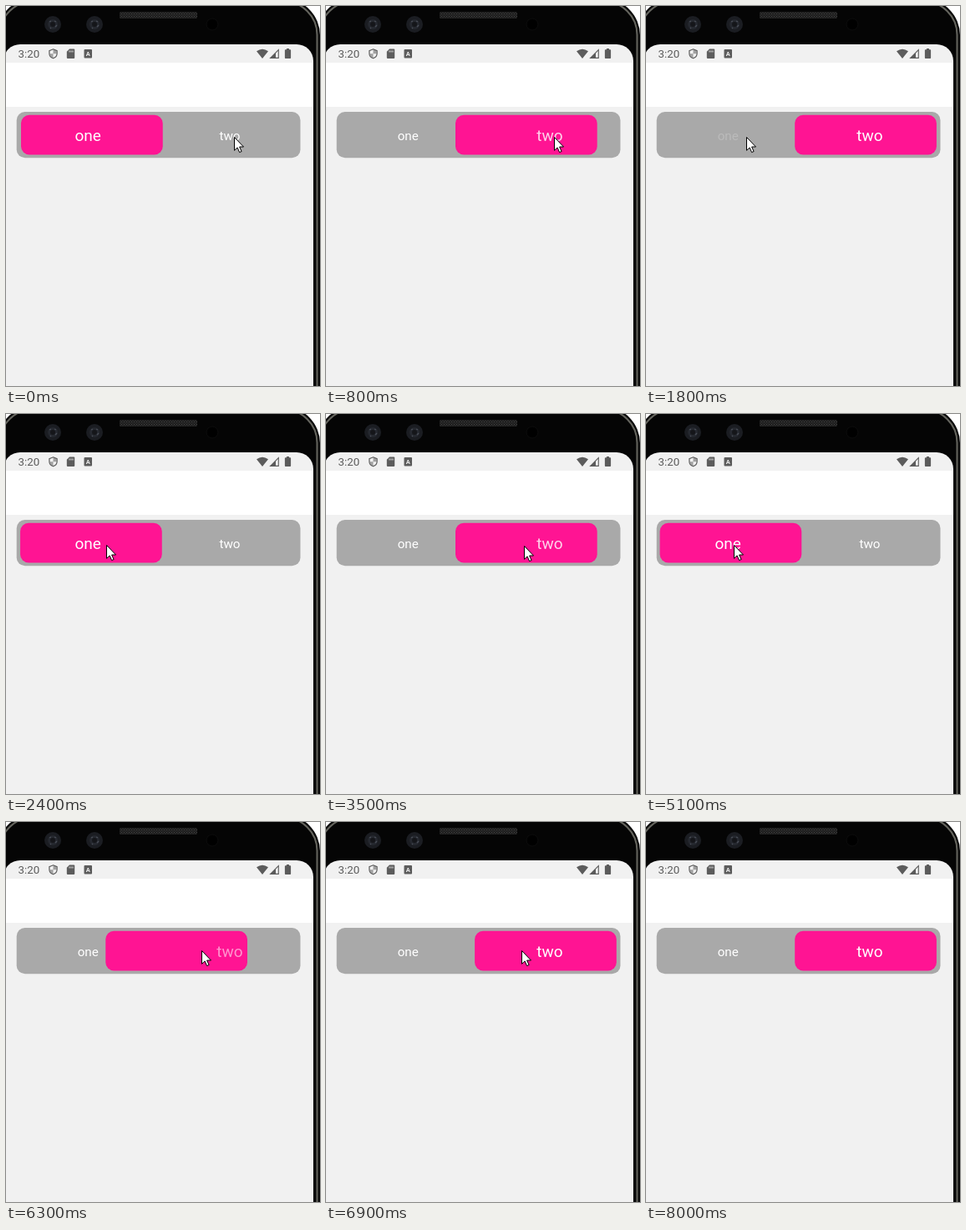
An HTML page for the animation above (9000 ms loop, 376x456 px).

```html
<!DOCTYPE html>
<html lang="en">
<head>
<meta charset="utf-8">
<title>Segmented switch</title>
<style>
  html, body { margin: 0; width: 100%; height: 100%; overflow: hidden; background: #fff; }
  svg { display: block; font-family: Roboto, sans-serif; }
</style>
</head>
<body>
<svg width="376" height="456" viewBox="0 0 376 456">
  <defs>
    <pattern id="mesh" width="3" height="3" patternUnits="userSpaceOnUse">
      <rect width="3" height="3" fill="#1c1c1c"/>
      <path d="M0 0h1v1H0zM1.5 1.5h1v1h-1z" fill="#444"/>
    </pattern>
    <g id="lens">
      <circle r="10" fill="#1b1d22"/>
      <circle r="6" fill="#25282f"/>
      <circle r="3" fill="#15161a"/>
      <path d="M-4-3l2-1M3 3l2-2M-3 4l1 1M2-4l2 1" stroke="#4a4e57" stroke-width="1.3"/>
    </g>
  </defs>

  <!-- phone body -->
  <rect x="-11" y="-9" width="387" height="600" rx="44" fill="#0a0a0a"/>
  <rect x="-7.5" y="-5.5" width="380" height="600" rx="40" fill="#050505" stroke="#66665f" stroke-width="2"/>
  <rect x="136" y="7" width="93" height="8" rx="1.5" fill="url(#mesh)"/>
  <use href="#lens" x="56" y="22"/>
  <use href="#lens" x="106" y="22"/>
  <circle cx="247" cy="22" r="7" fill="#000" stroke="#0d0d0d"/>

  <!-- screen -->
  <rect x="-3" y="46" width="371" height="500" rx="20" fill="#f1f1f1"/>
  <rect y="68" width="368" height="53" fill="#fff"/>

  <!-- status bar -->
  <g fill="#5c5c5c">
    <text x="14.5" y="62.3" font-size="13.3">3:20</text>
    <path d="M56.5 51.8l4.6 1.8v3.4c0 2.8-2 4.9-4.6 5.8-2.6-.9-4.6-3-4.6-5.8v-3.4z" fill="none" stroke="#5c5c5c" stroke-width="1.2"/>
    <path d="M56.5 52l4 1.6v3.6h-4zM52.5 57.2h4v5c-2.300-1-3.600-2.700-4-5z" opacity=".55"/>
    <path d="M76 51.500h5.200q1 0 1 1v9.500q0 1-1 1h-7.400q-1 0-1-1v-7.200z"/>
    <path d="M76 53.500v2M78 53.500v2M80 53.500v2" stroke="#f1f1f1" stroke-width=".9"/>
    <rect x="93.500" y="52" width="9.500" height="10.500" rx="1"/>
    <text x="98.250" y="60" font-size="7.500" font-weight="700" text-anchor="middle" style="fill:#f1f1f1">A</text>
    <path d="M300 54.300q7-5 14 0L307 63z"/>
    <path d="M326.300 52.700v9.700h-9.700z" fill="none" stroke="#5c5c5c" stroke-width="1.1"/>
    <path d="M316 63l7-7v7z"/>
    <path d="M336 51h3v1.200h1.300q.8 0 .8.800v9.200q0 .8-.8.800h-5.600q-.8 0-.8-.8V53q0-.8.800-.8H336z"/>
  </g>

  <!-- switch -->
  <rect x="12.700" y="127" width="339.800" height="55.200" rx="10" fill="#a9a9a9"/>
  <rect id="pill" y="130.800" width="169.700" height="47.600" rx="10" fill="#ff1493"/>
  <g fill="#fff" text-anchor="middle">
    <text class="label" x="98.200">one</text>
    <text class="label" x="268">two</text>
  </g>

  <path id="cursor" d="M.5.500v15.800l3.600-3.400 2.500 5.700 2.500-1.100-2.500-5.500h4.900z" fill="#fff" stroke="#000"/>
</svg>
<script>
const LOOP = 9000, STEP = 100;
const LEFT = 17.8, TRAVEL = 160.4;
const FADE = 250, PRESSED = 0.2;

// press time, release time, chosen side
const taps = [
  [-800, -600, 0], [500, 635, 1], [1800, 1930, 0],
  [3200, 3335, 1], [4500, 4650, 0], [6000, 6183, 1],
];
// time, x, y
const path = [
  [0, 273, 157], [1700, 273, 157], [1800, 120, 157], [2700, 120, 157],
  [3000, 237, 158], [4400, 237, 158], [4500, 105, 157], [5400, 105, 157],
  [5600, 210, 155], [5800, 234, 154], [7700, 234, 154], [7900, 312, 56],
];
const HIDE_CURSOR = 8000;

const pill = document.getElementById('pill');
const cursor = document.getElementById('cursor');
const labels = document.querySelectorAll('.label');

// Underdamped spring from 0 to 1, stiffness 230.2, damping 22, mass 1
function spring(ms) {
  const s = ms / 1000, decay = 11, freq = Math.sqrt(230.2 - decay * decay);
  return 1 - Math.exp(-decay * s) * (Math.cos(freq * s) + decay / freq * Math.sin(freq * s));
}

const easeInOut = p => p < 0.5 ? 2 * p * p : 1 - 2 * (1 - p) ** 2;

function cursorAt(t) {
  const i = path.findIndex(p => p[0] > t);
  if (i < 0) return path[path.length - 1].slice(1);
  const [t0, x0, y0] = path[i - 1], [t1, x1, y1] = path[i];
  const k = (t - t0) / (t1 - t0);
  return [x0 + (x1 - x0) * k, y0 + (y1 - y0) * k];
}

function draw(t) {
  const [, released, side] = taps.filter(tap => tap[1] <= t).pop();
  const held = taps.find(tap => tap[0] <= t && t < tap[1]);
  const progress = spring(t - released);
  pill.setAttribute('x', LEFT + TRAVEL * (side ? progress : 1 - progress));

  labels.forEach((label, i) => {
    const size = i === side ? 19 : 15.2;
    let alpha = 1;
    if (held && held[2] === i) alpha = PRESSED;
    else if (i === side) alpha = PRESSED + (1 - PRESSED) * easeInOut(Math.min(1, (t - released) / FADE));
    label.setAttribute('font-size', size);
    label.setAttribute('y', 155.8 + size * 0.34);
    label.setAttribute('opacity', alpha);
  });

  cursor.setAttribute('transform', `translate(${cursorAt(t)})`);
  cursor.setAttribute('visibility', t < HIDE_CURSOR ? 'visible' : 'hidden');
}

function tick() {
  draw(Math.floor(performance.now() % LOOP / STEP) * STEP);
  requestAnimationFrame(tick);
}
tick();
</script>
</body>
</html>
```
